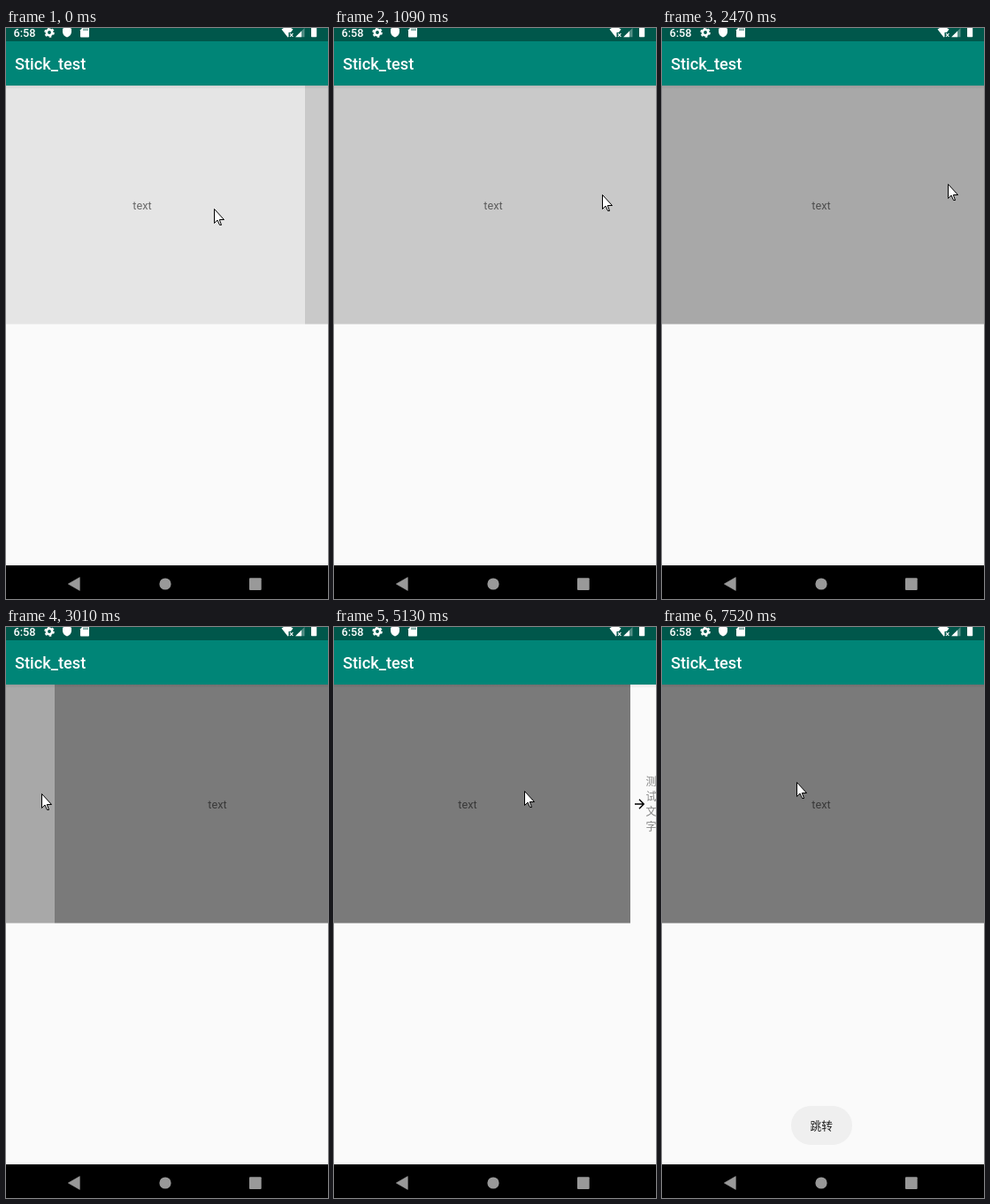
An HTML page for the animation above (8000 ms loop, 364x645 px).

```html
<!DOCTYPE html>
<html lang="en">
<head>
<meta charset="utf-8">
<title>Stick_test</title>
<style>
  html, body { margin: 0; width: 100%; height: 100%; overflow: hidden; background: #fafafa; }
  svg { display: block; width: 100vw; height: 100vh; }
  text { font-family: Roboto, "Noto Sans CJK SC", "Noto Sans CJK", sans-serif; }
  .bar { fill: #fff; font-weight: 500; }
  .label { font-size: 12.7px; text-anchor: middle; fill: #000; fill-opacity: .54; }
  .hint { font-size: 12px; text-anchor: middle; fill: #858585; }
  .cjk { font-family: "Noto Sans CJK SC", "Noto Sans CJK", sans-serif; }
</style>
</head>
<body>
<svg viewBox="0 0 364 645" preserveAspectRatio="none">
  <defs>
    <linearGradient id="shade" x2="0" y2="1">
      <stop offset="0" stop-opacity=".09"/>
      <stop offset="1" stop-opacity="0"/>
    </linearGradient>
  </defs>
  <rect width="364" height="645" fill="#fafafa"/>

  <g id="strip">
    <g id="pages"></g>
    <g id="more" transform="translate(1468 0)">
      <path d="M5 200h10M10 194.8l5.2 5.2-5.2 5.2" fill="none" stroke="#000" stroke-width="1.4"/>
    </g>
  </g>
  <rect y="65" width="364" height="4" fill="url(#shade)"/>

  <rect width="364" height="15" fill="#00574b"/>
  <rect y="15" width="364" height="50" fill="#008577"/>
  <text class="bar" x="8.5" y="9.7" font-size="12.7">6:58</text>
  <text class="bar" x="10" y="47" font-size="18.2">Stick_test</text>

  <g fill="#fff">
    <circle cx="49" cy="5" r="3.2" fill="none" stroke="#fff" stroke-width="2.6"/>
    <circle cx="49" cy="5" r="5" fill="none" stroke="#fff" stroke-width="1.6" stroke-dasharray="2.62 2.62"/>
    <path d="M69-1.5l5 2.2v3.6c0 3-2.1 5.3-5 6.2-2.9-.9-5-3.2-5-6.2V.7z"/>
    <path d="M87.5-1.5h5.7q.8 0 .8.8v10.4q0 .8-.8.8h-8.4q-.8 0-.8-.8V2.2z"/>
    <path d="M88 .5v2.6M90 .5v2.6M92 .5v2.6" stroke="#00574b" stroke-width=".9"/>
    <path d="M311.5 1.5q6.5-5 13 0l-2.6 3.5h-2.4v5L318.5 10.6z"/>
    <path d="M321 6.2l3.4 3.6M324.4 6.2L321 9.8" stroke="#fff" stroke-width="1.1"/>
    <path d="M337.5 0v10.3h-10.3z" fill-opacity=".32"/>
    <path d="M334 3.5v6.8h-6.8z"/>
    <path d="M345 0h6.2v9.6q0 .7-.7.7h-4.8q-.7 0-.7-.7z"/>
  </g>

  <g id="toast">
    <rect x="146" y="541" width="69" height="44" rx="22" fill="#efefef"/>
    <text class="cjk" x="180.3" y="568" font-size="12.7" text-anchor="middle" fill="#202020">跳转</text>
  </g>

  <rect y="607" width="364" height="38" fill="#000"/>
  <g fill="#999">
    <path d="M70.3 628l13-7.4v14.8z" stroke="#999" stroke-width=".6" stroke-linejoin="round"/>
    <circle cx="180" cy="628" r="6.6"/>
    <rect x="275" y="621.3" width="13.7" height="13.7" rx="1"/>
  </g>

  <path id="cursor" d="M.5.5v16l3.5-3.5 2.5 5.5h2l-2.2-6h5.2z" fill="#fff" stroke="#000" stroke-linejoin="round"/>
</svg>

<script>
const LOOP = 8000, PAGE = 368, LEFT = -4, PULL = 35, SWIPE = 700;
const NS = 'http://www.w3.org/2000/svg';
const $ = id => document.getElementById(id);

function add(parent, tag, attrs, text = '') {
  const el = document.createElementNS(NS, tag);
  for (const k in attrs) el.setAttribute(k, attrs[k]);
  el.textContent = text;
  parent.append(el);
}

['#e5e5e5', '#c9c9c9', '#a8a8a8', '#7a7a7a'].forEach((fill, i) => {
  const x = LEFT + i * PAGE;
  add($('pages'), 'rect', { x, y: 65, width: PAGE, height: 269.5, fill });
  add($('pages'), 'text', { x: x + 184, y: 205, class: 'label' }, 'text');
});
[...'测试文字'].forEach((c, i) =>
  add($('more'), 'text', { x: 23.5, y: 179 + i * 17, class: 'hint cjk' }, c));

// Bursts of screen refreshes: start, end, count
const bursts = [
  [0, 0, 1], [150, 1090, 8], [1250, 2230, 8], [2350, 3260, 8],
  [3410, 4450, 8], [4590, 5550, 8], [5700, 5980, 3], [7100, 7520, 4]
];

// Turning points of the pointer: time, x, y
const turns = [
  [-114, 250, 204], [520, 70, 202], [1090, 303, 188], [1250, 303, 188],
  [1800, 60, 190], [2350, 323, 176], [2470, 323, 176], [3010, 40, 188],
  [3260, 160, 177], [4290, 287, 197], [4450, 287, 197], [5550, 182, 179],
  [5980, 152, 175]
];
const swipes = [-114, 1310, 2477];

// Smoothstep from 0 at time a to 1 at time b
function ease(t, a, b) {
  const f = Math.min(1, Math.max(0, (t - a) / (b - a)));
  return f * f * (3 - 2 * f);
}

function refreshTime(now) {
  const [start, end, count] = bursts.findLast(b => b[0] <= now);
  if (count === 1) return start;
  const gap = (end - start) / (count - 1);
  return Math.min(end, start + gap * Math.floor((now - start) / gap + .1));
}

function pointer(t) {
  let [, x, y] = turns[0];
  for (let i = 1; i < turns.length; i++) {
    const f = ease(t, turns[i - 1][0], turns[i][0]);
    x += (turns[i][1] - x) * f;
    y += (turns[i][2] - y) * f;
  }
  return [Math.round(x), Math.round(y)];
}

function draw() {
  const t = refreshTime(performance.now() % LOOP);
  const scroll = PAGE * swipes.reduce((sum, s) => sum + ease(t, s, s + SWIPE), 0);
  const pull = PULL * (ease(t, 4450, 5400) - ease(t, 6960, 7380));
  const [x, y] = pointer(t);
  $('cursor').setAttribute('transform', `translate(${x} ${y})`);
  $('strip').setAttribute('transform', `translate(${-Math.round(scroll + pull)} 0)`);
  $('toast').setAttribute('opacity', ease(t, 7240, 7520));
  requestAnimationFrame(draw);
}
draw();
</script>
</body>
</html>
```
